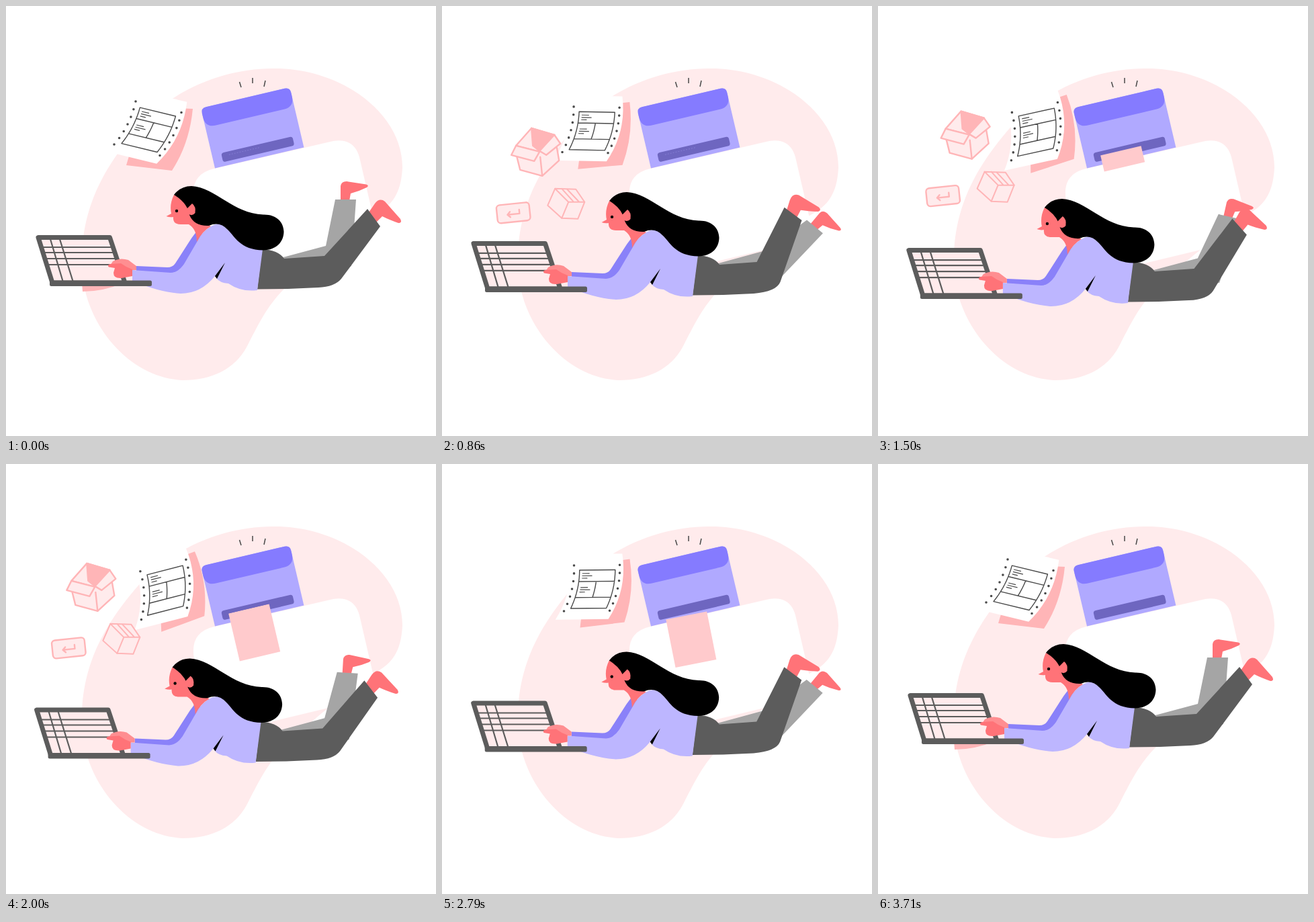
Write an HTML page that moves like this. It is 640 px wide and 640 px high and loops after 3.78 s.

```html
<!DOCTYPE html>
<html lang="en">
<head>
<meta charset="utf-8">
<title>Working online</title>
<style>
html, body { margin: 0; width: 100%; height: 100%; overflow: hidden; background: #fff; }
svg { display: block; width: 100vw; height: 100vh; }
.ink { fill: none; stroke: #4a4a4a; }
.icon { fill: #ffebec; stroke: #ffb5b7; stroke-width: 2.4; stroke-linejoin: round; stroke-linecap: round; }
.skin { fill: #ff7378; }
.lilac { fill: #bdb6ff; }
</style>
</head>
<body>
<svg viewBox="0 0 640 640">
  <defs><clipPath id="slot"><rect x="-60" y="78" width="300" height="300"/></clipPath></defs>

  <!-- backdrop -->
  <path fill="#ffebec" d="M113,390 C110,310 140,250 185,195 C235,130 320,92 400,93 C500,93 590,160 590,240 C588,285 570,300 545,313 C500,345 445,390 413,422 C388,448 378,470 362,500 C345,538 310,557 263,557 C180,553 116,470 113,390Z"/>
  <path fill="#ffb5b7" d="M113,412H175Q145,425 114,425Z"/>
  <path fill="#fff" d="M310,242L487,201Q518,196 526,225L548,320Q553,345 530,351L330,399Q306,402 300,375L280,290Q273,250 310,242Z"/>

  <!-- shipping form -->
  <path id="under" fill="#ffb5b7"/>
  <path id="sheet" fill="#fff"/>
  <path id="holes" class="ink" stroke-width="3.6" stroke-linecap="round"/>
  <path id="table" class="ink" stroke-width="1.4" stroke-linejoin="round"/>
  <path id="notes" class="ink" stroke-width="1.2"/>

  <!-- printer -->
  <path class="ink" stroke-width="1.5" d="M347.500,113L350,121M367,107V115M386,111L384,120"/>
  <g transform="translate(290 152) rotate(-13.2)">
    <path fill="#b0a9ff" d="M0,92V8Q0,0 8,0H128Q136,0 136,8V92Z"/>
    <path fill="#857bff" d="M0,8Q0,0 8,0H128Q136,0 136,8V14Q136,30 120,30H16Q0,30 0,14Z"/>
    <rect x="14" y="72" width="109" height="14" rx="4" fill="#6e66c0"/>
    <path id="edge" d="M25,77H72" stroke="#9088dd" stroke-width=".8" stroke-dasharray="2 2"/>
    <g clip-path="url(#slot)"><rect id="print" x="24" y="78" width="62" height="73" fill="#ffcacc"/></g>
  </g>

  <!-- floating icons -->
  <g id="icons" class="icon">
    <path d="M98,189L103,209L136,218L161,195L157,172L132,181Z"/>
    <path d="M133,190L136,218"/>
    <path d="M120,147L154,157L132,182L97,173Z"/>
    <path fill="#ffb5b7" d="M120,147L154,157L132,181L122,173Z"/>
    <path d="M97,173L132,182L124,196L90,187Z"/>
    <path d="M154,157L163,170L142,187L132,181Z"/>
    <path stroke-width="2" d="M155,237L186,238L199,257L189,282L165,281L144,262Z"/>
    <path stroke-width="2" fill="none" d="M155,237L175,257H199M175,257L165,281M165,237L183,257M173,238L191,257"/>
    <g transform="translate(93 273) rotate(-6)">
      <rect x="-24.500" y="-13.500" width="49" height="27" rx="5"/>
      <path fill="none" d="M9,-4V2H-9M-5,-2L-9,2L-5,6"/>
    </g>
  </g>

  <!-- woman and laptop -->
  <g id="woman">
    <path id="backFoot" class="skin" d="M498,290V268Q499,261 507,261L536,265.500Q541,267 537,270Q525,276 513,279L511,290Z"/>
    <path id="backLeg" fill="#a5a5a5"/>
    <path id="frontFoot" class="skin" d="M540,307L549,294Q556,285 564,291L587,317Q590,323 584,323Q570,318 560,313L551,322Z"/>
    <path id="frontLeg" fill="#5c5c5c"/>

    <path fill="#ffebec" stroke="#5c5c5c" stroke-width="7" stroke-linejoin="round" d="M48,344.500H154.500L177,412H69Z"/>
    <path fill="none" stroke="#5c5c5c" stroke-width="2.200" d="M55,359H159M57,367H162M60,376H165M62,385H160M66,347L85,411M80,347L100,411"/>

    <path fill="#8a81f9" d="M284,335Q276,345 270,355L252,383Q248,389 240,389L194,387V394L245,398L275,390L292,340Z"/>
    <path class="lilac" d="M302,330Q318,318 330,333L382,362L374,423Q350,426 331,413Q318,412 313,405L311,402Q290,428 260,428Q228,426 188,409V393L245,397Q256,397 265,384L286,348Q292,336 302,330Z"/>
    <path d="M326,382L311,402L314,406Z"/>
    <path fill="#ff8e91" d="M194,387V393H187Q175,390 168,386L155,386L159,380Q170,374 182,378Z"/>
    <path class="skin" d="M188,402L172,405Q160,406 160,397L162,390L153,388.500Q150,385.500 155,384L171,383Q179,389 188,392Z"/>
    <rect x="65" y="408.500" width="152" height="8.500" rx="2.500" fill="#5c5c5c"/>

    <path class="skin" d="M250,281Q243,295 246,309L238.500,313Q244,315 249,314Q248,325 260,325H272Q284,332 284,351Q292,335 305,328L290,318L275,290Z"/>
    <path d="M250,281Q260,268 276,268C312,270 338,309 383,310.500C402,310 413,321 413.500,336C413,352 402,363 383,363.500C348,363 341,343 330,333Q318,320 302,327Q280,328 273,311Q270,293 250,281Z"/>
    <path class="skin" d="M268,303L277,294Q283,298 281.500,308Q278,313 272,310Z"/>
    <circle cx="254" cy="305" r="2.200"/>
  </g>
</svg>
<script>
const LOOP = 3780, STEP = 71.25, LAST = 52;
const $ = id => document.getElementById(id);
const set = (id, name, value) => $(id).setAttribute(name, value);
const mix = (a, b, k) => a + (b - a) * k;
const mixPt = (a, b, k) => [mix(a[0], b[0], k), mix(a[1], b[1], k)];
const clamp = x => Math.max(0, Math.min(1, x));
const ease = x => (1 - Math.cos(Math.PI * clamp(x))) / 2;
const str = p => p[0].toFixed(2) + "," + p[1].toFixed(2);
const line = pts => "M" + pts.map(str).join("L");

// Value of a keyed track with a sine ease between the keys
function track(n, keys) {
  for (let i = 1; i < keys.length; i++) {
    const [a, va] = keys[i - 1], [b, vb] = keys[i];
    if (n <= b) return mix(va, vb, ease((n - a) / (b - a)));
  }
  return keys[keys.length - 1][1];
}

function turn([x, y], [cx, cy], deg) {
  const r = deg * Math.PI / 180, c = Math.cos(r), s = Math.sin(r);
  return [cx + (x - cx) * c - (y - cy) * s, cy + (x - cx) * s + (y - cy) * c];
}

function drawForm(s) {
  const a = mixPt([193, 142], [200, 160], s);
  const b = mixPt([185, 178], [211, 196], s);
  const c = mixPt([161, 206], [202, 232], s);
  const rise = mix(16.5, -18, s);
  // Point on the bent sheet: u across, v down
  const at = (u, v) => {
    const q = i => (1 - v) ** 2 * a[i] + 2 * v * (1 - v) * b[i] + v * v * c[i];
    return [q(0) + 68 * u, q(1) + rise * u];
  };
  const across = (v, u0, u1) => line([at(u0, v), at(u1, v)]);
  const down = (u, v0, v1) => {
    const pts = [];
    for (let i = 0; i <= 10; i++) pts.push(at(u, mix(v0, v1, i / 10)));
    return pts;
  };

  set("sheet", "d", line([...down(-0.08, -0.23, 1.2), ...down(1.08, 1.2, -0.23)]) + "Z");

  let holes = "";
  for (let i = 0; i < 7; i++)
    for (const u of [0, 1]) holes += "M" + str(at(u, i / 6)) + "h.01";
  set("holes", "d", holes);

  const frame = line([...down(0.12, 0.1, 0.94), ...down(0.9, 0.94, 0.1)]) + "Z";
  set("table", "d", frame + across(0.34, 0.12, 0.9) + across(0.69, 0.12, 0.9) + line(down(0.5, 0.34, 0.69)));

  let notes = "";
  for (const v of [0.17, 0.47])
    [0.34, 0.4, 0.3].forEach((u, i) => { notes += across(v + i * 0.05, 0.18, u); });
  set("notes", "d", notes);

  const tl = mixPt([205, 150], [228, 150], s), tr = mixPt([278, 153], [281, 130], s);
  const bend = mixPt([273, 205], [301, 175], s);
  const br = mixPt([247, 245], [296, 226], s), bl = mixPt([179, 237], [232, 250], s);
  set("under", "d", `M${str(tl)}L${str(tr)}Q${str(bend)} ${str(br)}L${str(bl)}Z`);
}

function drawLegs(k) {
  const front = [488, 386], back = [487, 374];
  const fa = -17.4 * k, ba = 39.5 * k;
  const f = (x, y) => str(turn([x, y], front, fa));
  const b = (x, y) => str(turn([x, y], back, ba));
  set("frontFoot", "transform", `rotate(${fa} ${front})`);
  set("backFoot", "transform", `rotate(${ba} ${back})`);
  set("frontLeg", "d", `M381,362Q405,363 414,376L${str(mixPt([474, 372], [469.5, 372], k))}L${f(538, 302)}L${f(557, 328)}L${f(499, 406)}Q${f(489, 418)} 465,419Q420,421.500 374,421.500Z`);
  set("backLeg", "d", `M405,376L${str(mixPt([476, 357], [482, 355], k))}L${b(490, 288)}L${b(521, 288)}L${b(514, 387)}L480,400L420,385Z`);
}

function draw(ms) {
  const n = Math.min(LAST, Math.floor((ms % LOOP) / STEP + 0.05));

  const bob = track(n, [[0, 0], [27, 1], [52, 0]]);
  set("woman", "transform", `translate(${-2.4 * bob} ${21.6 * bob})`);
  drawLegs(track(n, [[0, 0], [10, 1], [13, 1], [26, 0], [36.5, 1], [41, 1], [52, 0]]));
  drawForm(track(n, [[0, 0], [26, 1], [52, 0]]));

  const left = Math.max(0, 31 - n) ** 2 * 0.0964;
  set("icons", "transform", `translate(${left * 0.38} ${left})`);
  set("icons", "opacity", Math.min(clamp(n / 5), clamp((36 - n) / 6)));

  const out = ease((n - 17) / 10), fall = ease((n - 35) / 17);
  set("print", "transform", `translate(${-9.5 * fall} ${-74 * (1 - out) + 79 * fall}) rotate(${15 * fall} 55 114.5)`);
  set("print", "opacity", clamp((51 - n) / 6));
  set("edge", "opacity", n < 17 ? 0.8 : 0);
}

function tick(now) {
  draw(now);
  requestAnimationFrame(tick);
}
draw(0);
requestAnimationFrame(tick);
</script>
</body>
</html>
```
